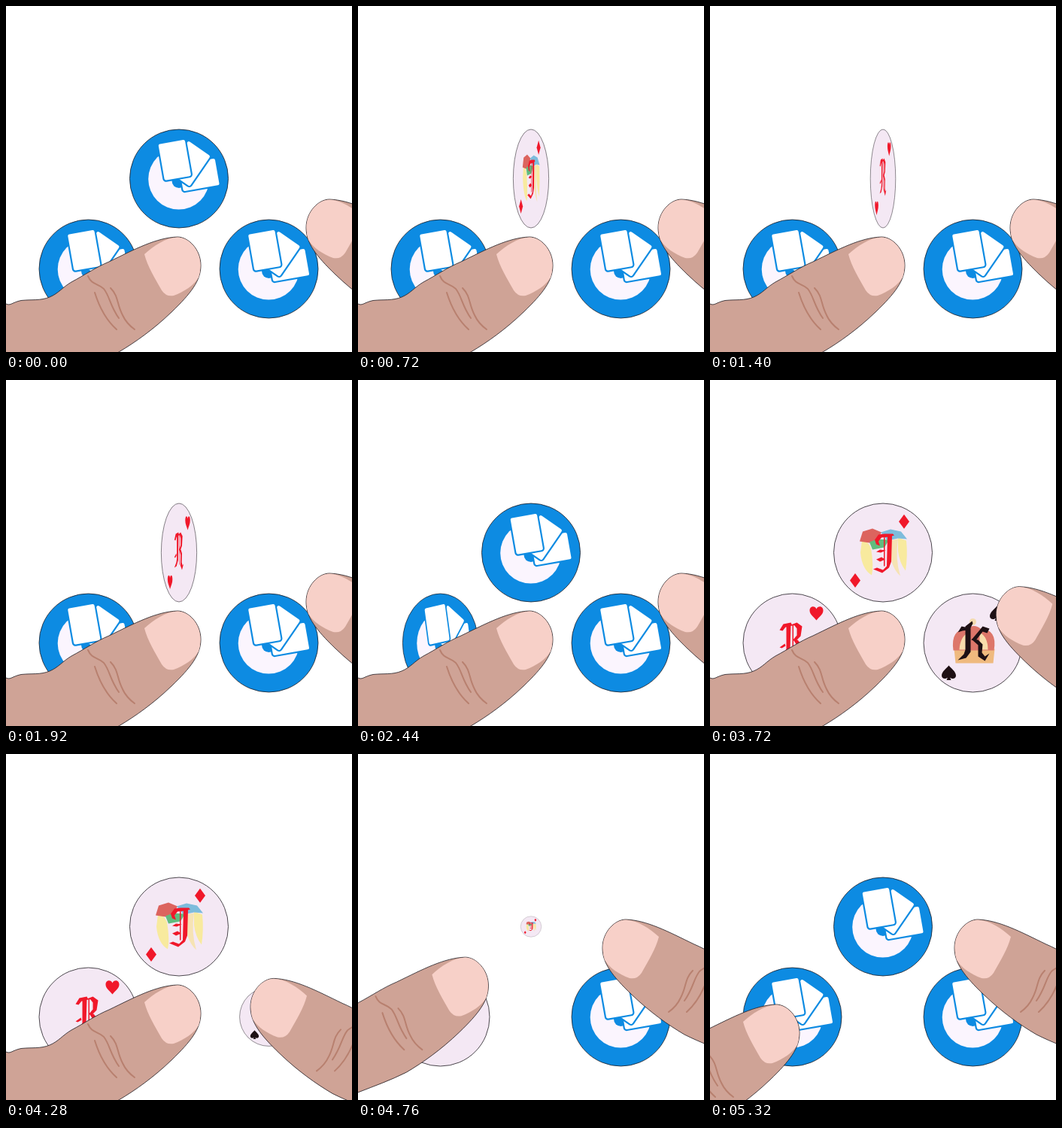
Animation of 460x460 px, one loop 5.36 s. Source, as an HTML page:

```html
<!DOCTYPE html>
<html lang="en">
<head>
<meta charset="utf-8">
<title>Card coins</title>
<style>
  html, body { margin: 0; width: 100%; height: 100%; overflow: hidden; background: #fff; }
  svg { display: block; width: 100vw; height: 100vh; }
  .rim { stroke: #201c22; stroke-width: .8; }
  .card { fill: #fff; stroke: #0d8be2; stroke-width: 2.2; }
  .red { fill: #f0182a; }
  .dark { fill: #1e1014; }
  .crease { fill: none; stroke: #b8806f; stroke-width: 2; stroke-linecap: round; }
</style>
</head>
<body>
<svg viewBox="0 0 460 460">
  <defs>
    <rect id="card" class="card" x="-19" y="-25.5" width="38" height="51" rx="3.5"/>
    <path id="heart" class="red" d="M0,9 C-4,4 -9,1 -9,-4 C-9,-10 -2,-11 0,-6 C2,-11 9,-10 9,-4 C9,1 4,4 0,9Z"/>
    <path id="diamond" class="red" d="M0,-9.5 L7,0 L0,9.5 L-7,0Z"/>
    <path id="spade" class="dark" d="M0,-10 C3,-6 9.5,-2 9.5,3.5 C9.5,8 4,8.5 1.5,6 L3,9.5 H-3 L-1.5,6 C-4,8.5 -9.5,8 -9.5,3.5 C-9.5,-2 -3,-6 0,-10Z"/>

    <g id="back">
      <circle class="rim" r="65.5" fill="#0d8be2"/>
      <circle cx="-.3" cy=".5" r="40.5" fill="#fbf5fe"/>
      <circle cx="0" cy="3" r="9.5" fill="#0d8be2"/>
      <use href="#card" transform="translate(26.7,-5) rotate(80)"/>
      <use href="#card" transform="translate(13.3,-20) rotate(34.5)"/>
      <use href="#card" transform="translate(-5.7,-24.7) rotate(-10)"/>
    </g>

    <circle id="blank" class="rim" r="65.5" fill="#f4e8f4"/>

    <g id="R">
      <use href="#blank"/>
      <path class="red" d="M-17,-17 L-12,-25 L-2,-27 L0,-23 L-9,-21 L-13,-16Z
        M-8,-23 L-2,-24 L-3,10 L-9,18 L-17,20 L-10,13 L-8,8Z
        M0,-24 H1.5 V16 H0Z
        M-2,-24 L6,-27 L13,-22 L11,-9 L5,-3 L0,-3 L6,-10 L6,-19 L3,-23Z
        M2,-3 L7,-4 L11,1 L10,13 L13,17 L17,15 L11,23 L5,17 L6,3Z
        M-17,6 L-10,1 L-9,4 L-14,7Z"/>
      <use href="#heart" x="32" y="-39"/>
      <use href="#heart" x="-33" y="39.5"/>
    </g>

    <g id="J">
      <use href="#blank"/>
      <path fill="#f8ea9e" d="M-28,-16 Q-20,-16 -16,-6 Q-12,18 -15,30 Q-28,22 -30,0Z M20,-20 L31,-16 Q33,4 30,24 Q22,14 20,-2Z"/>
      <path fill="#f6e3b4" d="M8,-16 L20,-18 Q16,8 23,31 Q8,18 8,-16Z"/>
      <path fill="#dc645e" d="M-31,-15 L-27,-28 L-14,-32 L-2,-27 L-8,-16 L-18,-13Z"/>
      <path fill="#7dbcdc" d="M-3,-27 L10,-31 L24,-28 L32,-18 L20,-19 L6,-16Z"/>
      <path fill="#60bc7e" d="M-18,-14 L-8,-18 L8,-17 L2,-7 L-14,-4Z"/>
      <path class="red" d="M-11,-17 L-6,-24 L2,-25 L13,-25 L15,-23 L8,-21 L-2,-20 L-6,-15 L-4,-9 L-9,-11Z
        M6,-23 L12,-22 L11,12 L8,20 L-1,27 L-13,22 L-8,20 L0,23 L5,18Z
        M1,-21 H2.5 V18 H1Z
        M-9,-1 L-4,-4 L4,-3 L-3,0Z M-9,9 L-2,6 L3,9 L-4,12Z"/>
      <use href="#diamond" x="28" y="-41.3"/>
      <use href="#diamond" x="-37" y="37"/>
    </g>

    <g id="K">
      <use href="#blank"/>
      <circle cy="-28" r="4.5" fill="#f4dcb0"/>
      <path fill="#efba7e" d="M-25,8 H29 L27,27 H-23Z"/>
      <path fill="#dd766a" d="M-26,10 Q-30,-18 -8,-19 Q2,-26 10,-19 Q33,-18 28,10Z"/>
      <path fill="#f8dcac" d="M-18,9 Q-17,-8 -6,-14 V9Z M20,9 Q20,-8 9,-14 V9Z"/>
      <path class="dark" d="M-10,-22 L-1,-29 L0,-26 L-3,-20 L-3,12 L-9,20 L-20,23 L-12,15 L-10,9Z
        M-20,-14 L-15,-22 L-6,-20 L-8,-17 L-14,-16Z
        M-2,-4 L9,-17 L13,-22 L22,-19 L19,-13 L13,-15 L3,-2Z
        M-2,-5 L7,-4 L13,2 L12,13 L16,18 L22,14 L16,24 L7,18 L7,3Z"/>
      <use href="#spade" x="32" y="-39"/>
      <use href="#spade" x="-32" y="40"/>
    </g>

    <g id="thumb">
      <path class="rim" fill="#cfa396" d="M228,307 C242,307 259,323 259,345 C259,365 246,382 220,407
        C196,430 172,447 150,460 C128,471 108,478 85,487 C40,505 0,520 -40,530 L-40,410
        L0,396 C6,399 8,394 20,391.5 C34,390 46,392 58,387 C70,382 75,374 87,367
        C104,358 120,347 137,340 C172,323 200,308 228,307Z"/>
      <path fill="#f7d0c8" d="M184,330 C196,319 212,308 228,307.4 C242,307.4 258.6,323 258.6,345
        Q258.5,354 256,361 C250,371 237,380 223,385 Q213,387 207,378 C198,362 188,346 184,330Z"/>
      <path class="crease" d="M109,359 C114,371 121,368 130,376 C138,386 138,398 150,415
        M139,375 C150,386 147,396 155,411 Q160,422 171,430
        M118,381 Q128,413 147,430"/>
    </g>
  </defs>

  <use id="top"/>
  <use id="left"/>
  <use id="right"/>
  <use id="thumbL" href="#thumb"/>
  <use id="thumbR" href="#thumb"/>
</svg>
<script>
const LOOP = 5360;
const $ = id => document.getElementById(id);
const turn = (start, face, dur = 400) => ({ start, dur, face });
const pop = (start, face) => ({ start, dur: 400, face, pop: true });

const coins = [
  { el: $('top'), x: 230, y: 229.5, moves: [
    turn(0, 'J', 568), turn(568, 'back'), turn(1168, 'R'), turn(1768, 'back'),
    turn(3300, 'J'), pop(4588, 'back')] },
  { el: $('left'), x: 109.5, y: 349.5, moves: [turn(2352, 'R'), pop(4915, 'back')] },
  { el: $('right'), x: 349.5, y: 349.5, moves: [turn(2910, 'K'), pop(4162, 'back')] }
];

const part = (t, start, dur = 400) => Math.min(1, Math.max(0, (t - start) / dur));
const mix = (a, b, p) => a + (b - a) * p;

// A turn narrows the coin, a pop shrinks it whole; the face swaps halfway.
function drawCoin({ el, x, y, moves }, t) {
  let face = 'back', sx = 1, sy = 1;
  for (const m of moves) {
    const p = part(t, m.start, m.dur);
    if (p >= .5) face = m.face;
    if (p > 0 && p < 1) {
      sx = Math.max(.004, Math.abs(Math.cos(Math.PI * p)));
      sy = m.pop ? sx : 1;
    }
  }
  el.setAttribute('href', '#' + face);
  el.setAttribute('transform', `translate(${x},${y}) scale(${sx},${sy})`);
}

function drawThumbs(t) {
  // The left thumb swings along an arc, the right one reaches down and lifts.
  const p = part(t, 4588), q = 1 - p;
  const lx = 2 * p * q * -121 + p * p * -140;
  const ly = 2 * p * q * -85 + p * p * 26;
  $('thumbL').setAttribute('transform', `translate(${lx},${ly})`);

  const reach = part(t, 3620), lift = part(t, 4174);
  const rx = mix(658, 584, reach);
  const ry = mix(-50, 20, reach) - 107 * lift;
  $('thumbR').setAttribute('transform', `translate(${rx},${ry}) scale(-1,1)`);
}

function draw(t) {
  coins.forEach(c => drawCoin(c, t));
  drawThumbs(t);
}

const begin = performance.now();
function tick() {
  draw((performance.now() - begin) % LOOP);
  requestAnimationFrame(tick);
}
draw(0);
requestAnimationFrame(tick);
</script>
</body>
</html>
```
